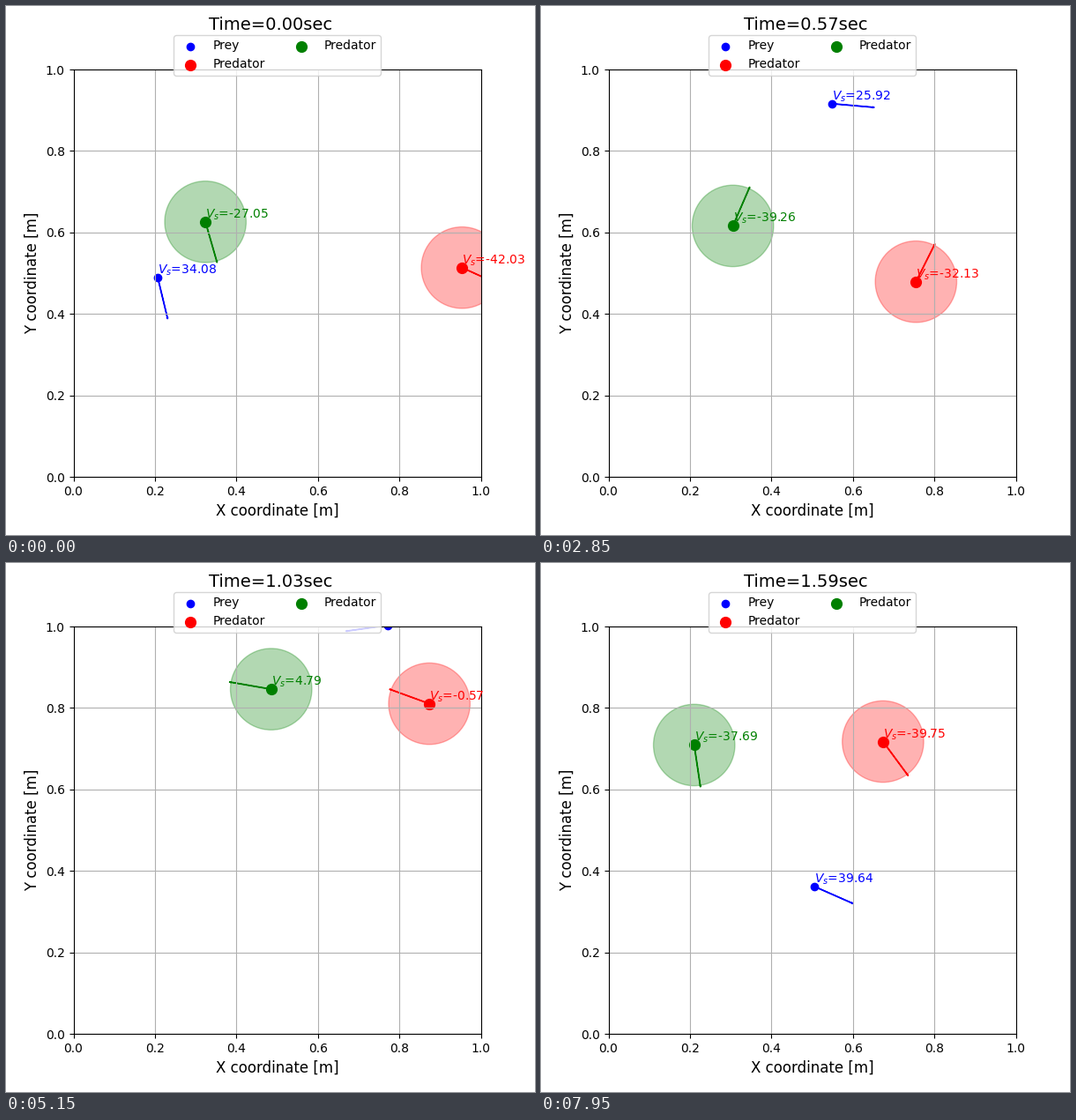
Write a matplotlib script that moves like this. It is 600x600 px and loops after 8000 ms.

```python
import numpy as np
import matplotlib.pyplot as plt
from matplotlib.animation import FuncAnimation
from matplotlib.patches import Circle

FRAMES, STEP_MS = 160, 50
REACH = 0.1       # halo radius and arrow length
OVERSHOOT = 0.003  # how far a body may push past a wall

# Key poses: frame, x, y, heading in degrees, V_s
PREY = [
    (0, 0.207, 0.489, -76.5, 34.08),
    (10, 0.008, 0.344, -110, 32),
    (27, 0.373, 0.255, 6, 29.06),
    (57, 0.549, 0.916, -5, 25.92),
    (87, 1.09, 0.996, 45, 10),
    (119, 0.079, 1.003, 165, 8),
    (140, 0.019, 0.535, -69, 42.95),
    (159, 0.506, 0.3615, -23.8, 39.64),
]
RED = [
    (0, 0.954, 0.5135, -24.4, -42.03),
    (27, 0.825, 0.337, 180, -33.38),
    (57, 0.755, 0.479, 63.4, -32.13),
    (87, 0.9275, 0.7165, 68.2, 1.88),
    (119, 0.7125, 0.8315, 180, -3.02),
    (140, 0.538, 0.847, -40, -51.33),
    (159, 0.674, 0.7175, -53.6, -39.75),
]
GREEN = [
    (0, 0.324, 0.626, -74, -27.05),
    (27, 0.2397, 0.4675, -68, -32.72),
    (57, 0.3055, 0.616, 66.6, -39.26),
    (87, 0.551, 0.771, 58.2, 3.08),
    (119, 0.3, 0.8545, 180, 6.51),
    (140, 0.1115, 0.866, -75, -51.18),
    (159, 0.2105, 0.709, -81.5, -37.69),
]


def swim(poses, speed):
    """Hermite path leaving each pose along its heading at the given speed."""
    keys, x, y, angle, vs = np.array(poses, float).T
    points = x + 1j * y
    velocity = speed * np.exp(1j * np.radians(angle))

    t = np.arange(FRAMES)
    i = np.clip(np.searchsorted(keys, t, side="right") - 1, 0, len(keys) - 2)
    h = keys[i + 1] - keys[i]
    s = (t - keys[i]) / h
    p0, p1, v0, v1 = points[i], points[i + 1], velocity[i], velocity[i + 1]
    path = (p0 + (p1 - p0) * s * s * (3 - 2 * s)
            + h * s * (1 - s) * (v0 * (1 - s) - v1 * s))
    slope = ((p1 - p0) * 6 * s * (1 - s) / h
             + v0 * (1 - s) * (1 - 3 * s) + v1 * s * (3 * s - 2))
    return path, np.angle(slope), np.interp(t, keys, vs)


class Agent:
    def __init__(self, ax, label, color, size, poses, speed, halo=False):
        path, self.heading, self.vs = swim(poses, speed)
        self.x, self.y = np.clip([path.real, path.imag],
                                 -OVERSHOOT, 1 + OVERSHOOT)
        self.halo = None
        if halo:
            self.halo = ax.add_patch(Circle((0, 0), REACH, color=color, alpha=0.3))
        self.arrow = ax.arrow(0, 0, REACH, 0, color=color)
        self.dot = ax.scatter([0], [0], s=size, c=color, label=label)
        self.note = ax.annotate("", (0, 0), color=color, va="bottom")

    def update(self, i):
        pos = self.x[i], self.y[i]
        if self.halo:
            self.halo.center = pos
        self.arrow.set_data(x=pos[0], y=pos[1],
                            dx=REACH * np.cos(self.heading[i]),
                            dy=REACH * np.sin(self.heading[i]))
        self.dot.set_offsets([pos])
        self.note.xy = pos
        self.note.set_position(pos)
        self.note.set_text(f"$V_s$={self.vs[i]:.2f}")


fig, ax = plt.subplots(figsize=(6, 6), dpi=100)
ax.set_aspect("equal")
ax.grid(True)
ax.set_xlabel("X coordinate [m]", fontsize=12)
ax.set_ylabel("Y coordinate [m]", fontsize=12)
title = fig.suptitle("Time=0.00sec", fontsize=14)

agents = [
    Agent(ax, "Prey", "blue", 36, PREY, 0.028),
    Agent(ax, "Predator", "red", 72, RED, 0.0098, halo=True),
    Agent(ax, "Predator", "green", 72, GREEN, 0.0098, halo=True),
]
ax.set_xlim(0, 1)
ax.set_ylim(0, 1)
ax.legend(loc="upper center", bbox_to_anchor=(0.5, 1.1), ncol=2)


def update(i):
    title.set_text(f"Time={i / 100:.2f}sec")
    for agent in agents:
        agent.update(i)
    return []


anim = FuncAnimation(fig, update, frames=FRAMES, interval=STEP_MS,
                     repeat=True, repeat_delay=0, blit=False)
plt.show()
```
